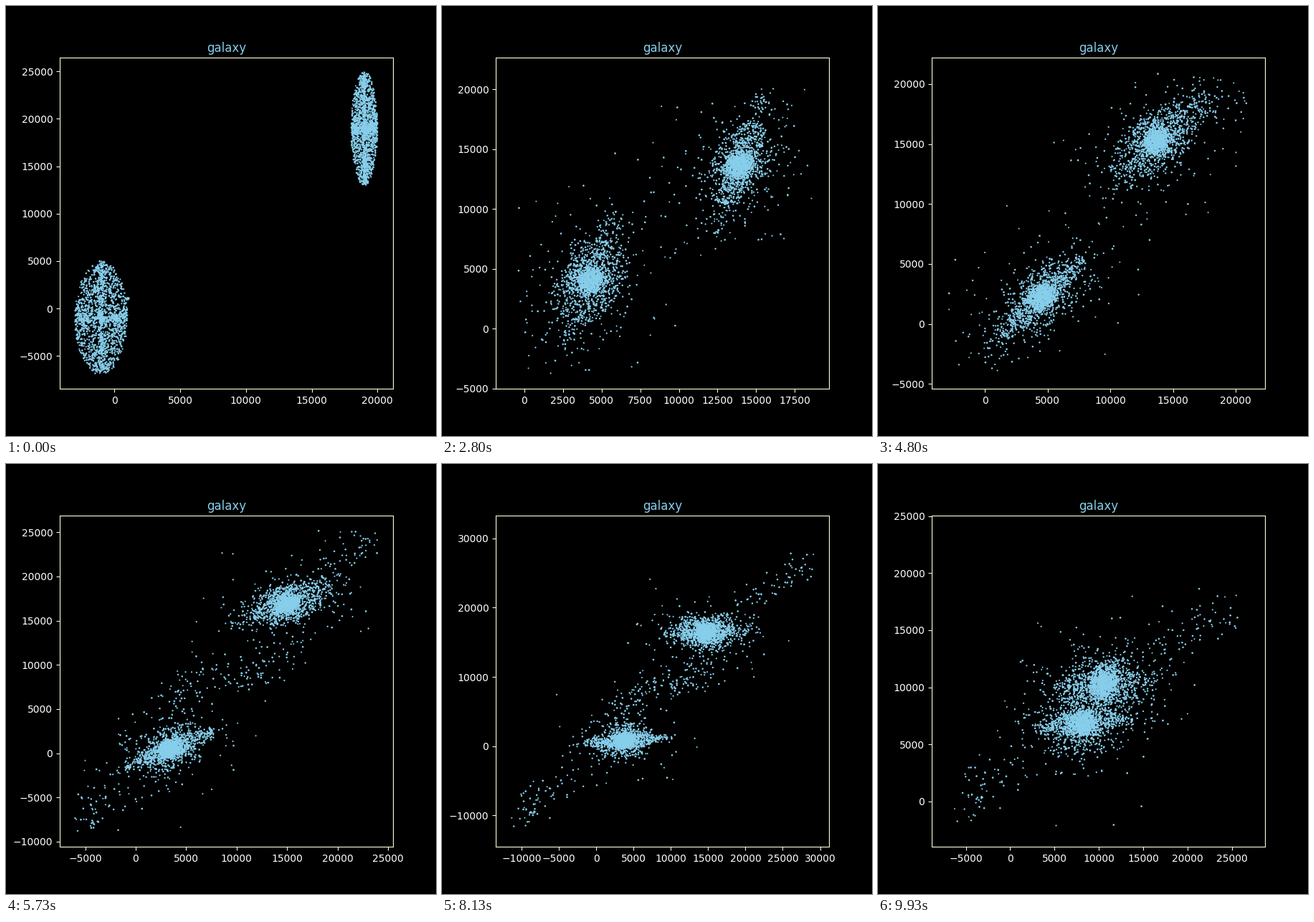
Recreate the animation shown at these times as a matplotlib script. Size 600 px wide and 600 px high, loop 9.99 s.

```python
import numpy as np
import matplotlib.pyplot as plt
from matplotlib.animation import FuncAnimation

FRAMES = 150
LOOP_MS = 9990
CORE, COLD, HOT, CLUMP = 900, 550, 350, 20   # stars per galaxy, one tight clump
TAIL, BRIDGE = 70, 90                        # hot stars drawn out by the pass
PASS, APEX = 51, 101.5                       # first encounter, widest swing

STAR = "skyblue"
LABEL = "white"
FRAME = "#ffffd8"

rng = np.random.default_rng(7)
time = np.arange(FRAMES)
T = time[:, None, None]


def smooth(t, start, end):
    u = np.clip((t - start) / (end - start), 0, 1)
    return u * u * (3 - 2 * u)


def spline(t, keys, values):
    """Smooth curve through the key points, starting at rest."""
    slope = np.gradient(values, keys, axis=0)
    slope[0] = 0
    i = min(np.searchsorted(keys, t, side="right"), len(keys) - 1) - 1
    h = keys[i + 1] - keys[i]
    u = (t - keys[i]) / h
    return ((1 + 2 * u) * (1 - u) ** 2 * values[i]
            + u * (1 - u) ** 2 * h * slope[i]
            + u * u * (3 - 2 * u) * values[i + 1]
            + u * u * (u - 1) * h * slope[i + 1])


# Camera key points: left, right, bottom, top.
VIEW_T = np.array([0, 18, 42, 72, 101, 122, 149])
VIEW = np.array([(-4150, 21180, -8450, 26450), (-5030, 22440, -10680, 28615),
                 (-1830, 19700, -5010, 22665), (-4230, 22340, -5400, 22210),
                 (-11120, 28920, -15690, 32070), (-13460, 31200, -14500, 33260),
                 (-8840, 28710, -3990, 25060)])


def gap(t):
    """Vector between the galaxies: free fall, pass through, fall back."""
    if t < PASS:
        dist, angle = 28280 * (1 - (t / PASS) ** 2) ** 0.64, 45
    else:
        u = (t - APEX) / (APEX - PASS)
        dist, angle = -21800 * (1 - u * u) ** 0.75, 55
    a = np.radians(angle)
    return dist * np.array([np.cos(a), np.sin(a)])


def ellipse(n, width, inner=0.0):
    """Random ellipse, denser along its two axes."""
    a = rng.uniform(0, 2 * np.pi, n)
    a -= 0.15 * np.sin(4 * a)
    r = rng.uniform(inner, 1, n)
    return np.column_stack([width * r * np.cos(a), 6000 * r * np.sin(a)])


def tilt(p):
    """The long axis slowly turns clockwise, from upright to nearly level."""
    a = np.radians(np.minimum(45 * (time / 72) ** 2, 85))[:, None]
    x, y = p[..., 0], p[..., 1]
    return np.stack([x * np.cos(a) + y * np.sin(a),
                     y * np.cos(a) - x * np.sin(a)], axis=-1)


def swing(a, b, speed):
    """Closed orbit that starts at a and reaches b a quarter turn later."""
    return a * np.cos(speed * T) + b * np.sin(speed * T)


def core(width):
    """Stars that sink to the middle and keep circling there."""
    size = rng.choice([0.6, 1.5], (CORE, 1), p=[0.55, 0.45])
    a, b = np.clip(rng.normal(size=(2, CORE, 2)), -1.7, 1.7) * size
    orbit = swing(a, b, rng.uniform(0.15, 0.5, (CORE, 1)))
    orbit = orbit * (600 + 3 * T) * np.array([0.9, 1.25])
    w = smooth(T, 0, 13)
    return ellipse(CORE, width) * (1 - w) + orbit * w


def cold(width):
    """Stars let go at rest: the outer ones swing in step and form plumes."""
    a = ellipse(COLD, width, 0.5)
    b = rng.normal(0, 500, (COLD, 2))
    radius = np.hypot(*a.T)[:, None]
    return swing(a, b, np.pi / 14 * np.sqrt(6000 / radius))


def hot(width, clump):
    a = ellipse(HOT, width, 0.3)
    if clump:
        a = np.vstack([a, 2000 + rng.normal(0, 55, (CLUMP, 2))])
    b = rng.normal(size=a.shape) * (2500, 3300)
    return swing(a, b, rng.uniform(0.15, 0.3, (len(a), 1))) * (1 + 0.002 * T)


def tail():
    """Stream flung outward past the far side of the galaxy."""
    u = np.clip((T - PASS) / (FRAMES - PASS), 0, 1) * np.pi
    tip = np.concatenate([13000 * np.sin(0.625 * u), 9600 * np.sin(0.8 * u)], -1)
    reach = 1.1 - 0.75 * rng.random((TAIL, 1)) ** 2
    return tip * reach + rng.normal(0, 1200, (TAIL, 2))


def bridge():
    """Arc of stars that leans over toward the other galaxy."""
    s = rng.random((BRIDGE, 1))
    arc = np.hstack([9000 * s * s - 500, 2500 + 18500 * s - 9500 * s * s])
    return -arc + rng.normal(0, 1200, (BRIDGE, 2))


def galaxy(side, width):
    loose = tilt(hot(width, side > 0))
    w = smooth(T, 50, 84)
    loose[:, :TAIL] += w * (side * tail() - loose[:, :TAIL])
    band = slice(TAIL, TAIL + BRIDGE)
    w = smooth(T, 66, 96) * (1 - smooth(T, 110, 142))
    loose[:, band] += w * (side * bridge() - loose[:, band])
    stars = np.concatenate([tilt(core(width)), tilt(cold(width)), loose], axis=1)

    drift = np.outer(time / FRAMES, (350, -450))
    centre = 9000 + drift - side * np.array([gap(t) for t in time]) / 2
    return stars + centre[:, None]


stars = np.concatenate([galaxy(1, 2000), galaxy(-1, 1000)], axis=1)

fig, ax = plt.subplots(figsize=(6, 6), dpi=100, facecolor="black")
ax.set_facecolor("black")
ax.set_title("galaxy", color=STAR)
ax.tick_params(color=FRAME, labelcolor=LABEL)
for spine in ax.spines.values():
    spine.set_color(FRAME)
dots = ax.scatter(stars[0, :, 0], stars[0, :, 1], color=STAR, linewidths=0,
                  s=rng.uniform(2, 4, stars.shape[1]))


def update(t):
    left, right, bottom, top = spline(t, VIEW_T, VIEW)
    ax.set_xlim(left, right)
    ax.set_ylim(bottom, top)
    lo, hi = np.array([left, bottom]), np.array([right, top])
    pad = 0.044 * (hi - lo)
    inside = ((stars[t] > lo + pad) & (stars[t] < hi - pad)).all(1)
    dots.set_offsets(np.where(inside[:, None], stars[t], np.nan))
    return dots,


anim = FuncAnimation(fig, update, frames=FRAMES, interval=LOOP_MS / FRAMES,
                     repeat=True, repeat_delay=0, blit=False)
plt.show()
```
